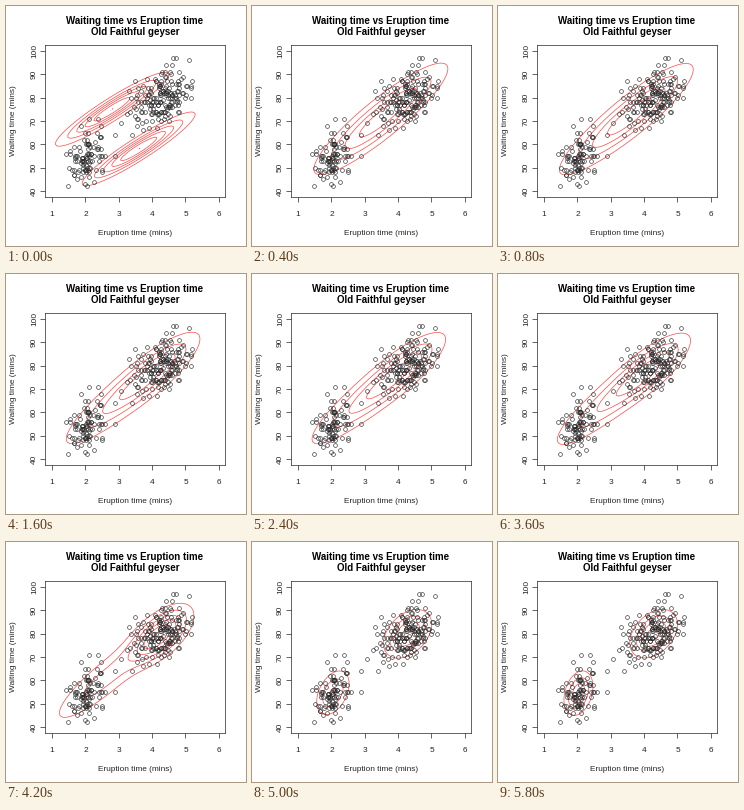
A matplotlib script for the animation above (6000 ms loop, 240 px wide and 240 px high).

```python
import numpy as np
import matplotlib.pyplot as plt
from matplotlib.animation import FuncAnimation

SIZE, FRAMES, STEP = 240, 30, 200
INK, RED = "#262626", "#ff4848"
plt.rcParams["font.family"] = "Liberation Sans"

# Mean and covariance of the short and the long eruptions
SHORT, LONG = 0.356, 0.644
M1, S1 = np.array([2.036, 54.48]), np.array([[0.0692, 0.435], [0.435, 33.7]])
M2, S2 = np.array([4.290, 79.97]), np.array([[0.170, 0.941], [0.941, 36.05]])
START = np.array([[0.8, 7], [7, 70]])

# A few eruptions away from both clusters
STRAY = [(5.1, 96), (3.5, 87), (3.32, 83), (3.33, 74), (3.07, 69),
         (3.4, 64), (2.38, 71), (2.9, 64), (2.88, 55), (1.98, 43)]


def cluster(rng, mean, cov, count):
    """Gaussian cloud without its far tail, with exact mean and covariance."""
    z = rng.standard_normal((count * 2, 2))
    z = z[np.hypot(*z.T) < 2.4][:count]
    z -= z.mean(axis=0)
    z = z @ np.linalg.inv(np.linalg.cholesky(np.cov(z.T))).T
    pts = mean + z @ np.linalg.cholesky(cov).T
    pts[:, 1] = np.round(pts[:, 1])
    return pts


def blend(short, long):
    """Weight, mean and covariance of a mix of both clusters."""
    total = short + long
    w = short / total
    d = M2 - M1
    cov = w * S1 + (1 - w) * S2 + w * (1 - w) * np.outer(d, d)
    return total, w * M1 + (1 - w) * M2, cov


def fall(i, middle, width):
    return 1 / (1 + np.exp((i - middle) / width))


def parts(i):
    """The two fitted Gaussians: a long plateau, then a quick separation."""
    if i == 0:
        return [(0.5, np.array([2.8, 75]), START),
                (0.5, np.array([3.6, 58]), START)]
    f = 0.68 * fall(i, 20, 0.95)
    g = 0.04 * fall(i, 23, 0.7) + 0.45 * np.exp(-i / 2)
    return [blend(SHORT * (1 - g), LONG * f), blend(SHORT * g, LONG * (1 - f))]


def density(weight, mean, cov):
    d = np.stack([X, Y], -1) - mean
    q = np.einsum("...i,ij,...j", d, np.linalg.inv(cov), d)
    return weight * np.exp(-q / 2) / (2 * np.pi * np.sqrt(np.linalg.det(cov)))


def levels(top, n=5):
    """Round contour steps for a range from zero to top."""
    cell = top / n
    base = 10 ** np.floor(np.log10(cell))
    unit = base
    for k, h in ((2, 1.5), (5, 2.75), (10, 1.5)):
        if k * base - cell < h * (cell - unit):
            unit = k * base
    return unit * np.arange(1, int(top / unit) + 1)


X, Y = np.meshgrid(np.linspace(1, 6, 100), np.linspace(40, 100, 100))
rng = np.random.default_rng(7)
points = np.vstack([cluster(rng, M1, S1, 94), cluster(rng, M2, S2, 168), STRAY])

# At 72 dpi one point is one pixel
fig = plt.figure(figsize=(SIZE / 72, SIZE / 72), dpi=72, facecolor="white")
left, right, top, bottom = 39.2, 219.4, 39.4, 190.5
ax = fig.add_axes([left / SIZE, 1 - bottom / SIZE,
                   (right - left) / SIZE, (bottom - top) / SIZE])
ax.set(xlim=(0.8, 6.2), ylim=(37.6, 102.4),
       xticks=range(1, 7), yticks=range(40, 101, 10))
ax.tick_params(length=4.6, width=0.7, color=INK,
               labelbottom=False, labelleft=False)
for spine in ax.spines.values():
    spine.set(linewidth=0.7, edgecolor=INK)


def label(x, y, text, size=8.2, **kw):
    fig.text(x / SIZE, 1 - y / SIZE, text, size=size, ha="center", **kw)


mid_x, mid_y = (left + right) / 2, (top + bottom) / 2
label(mid_x - 0.8, 17.6, "Waiting time vs Eruption time", 9.8, weight="bold")
label(mid_x, 28.8, "Old Faithful geyser", 9.8, weight="bold")
label(mid_x, 228.6, "Eruption time (mins)", color=INK)
label(7.5, mid_y, "Waiting time (mins)", rotation=90, va="center", color=INK)
for v in range(1, 7):
    label(46 + 33.4 * (v - 1), 210, str(v), color=INK)
for v in range(40, 101, 10):
    label(28.5, 185 - 7 / 3 * (v - 40), str(v),
          rotation=90, va="center", color=INK)

ax.plot(*points.T, "o", ms=3.8, mfc="none", mec=INK, mew=0.6, zorder=3)
rings = None


def draw(i):
    global rings
    if rings is not None:
        rings.remove()
    z = sum(density(*p) for p in parts(i))
    rings = ax.contour(X, Y, z, levels=levels(z.max()), colors=RED,
                       linewidths=0.7, zorder=2)
    return []


anim = FuncAnimation(fig, draw, frames=FRAMES, init_func=lambda: [],
                     interval=STEP, repeat=True, repeat_delay=0)
plt.show()
```
